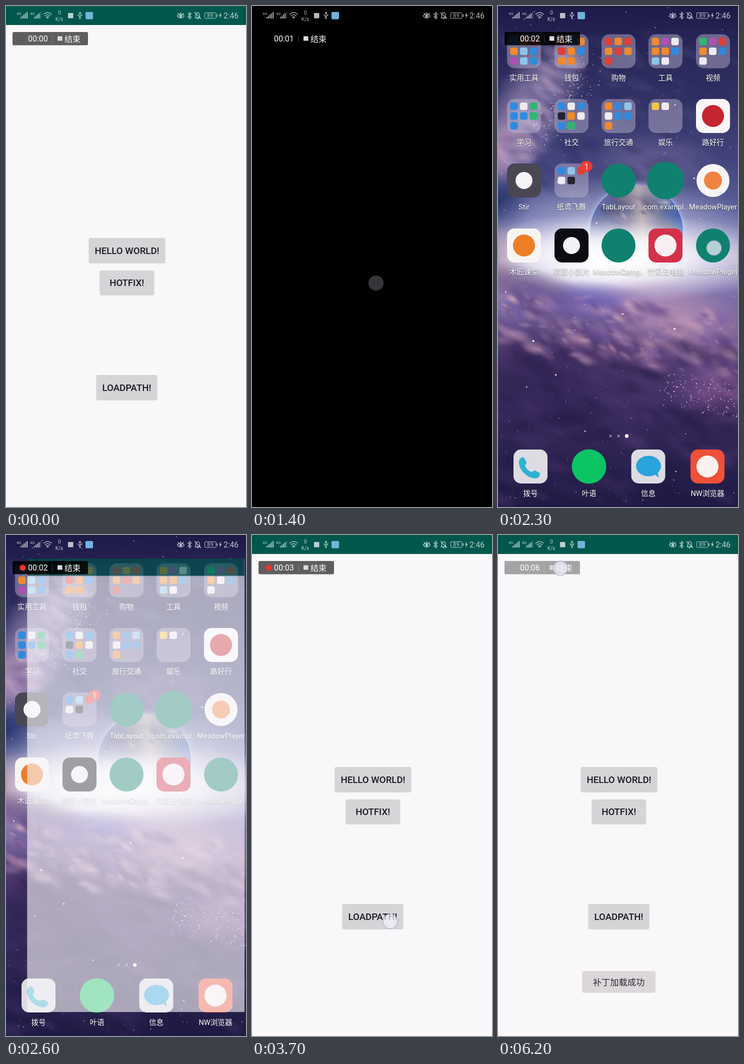
An HTML page with a canvas for the animation above (6300 ms loop, 480x1002 px).

```html
<!DOCTYPE html>
<html lang="zh">
<head>
<meta charset="utf-8">
<title>Hotfix demo</title>
<style>
html, body { margin: 0; width: 100%; height: 100%; overflow: hidden; background: #000; }
canvas, svg { position: absolute; left: 0; top: 0; width: 100%; height: 100%; display: block; }
text { font-family: Roboto, "Noto Sans CJK SC", "Noto Sans CJK", sans-serif; }
.mid { text-anchor: middle; }
.button { filter: drop-shadow(0 1.5px 1px rgba(0,0,0,.24)); }
.label { font-size: 14.6px; fill: #fff; text-anchor: middle; text-shadow: 0 1px 2px rgba(0,0,0,.55); }
.line { fill: none; stroke: #fff; stroke-width: 1.3; stroke-linecap: round; stroke-linejoin: round; }
</style>
</head>
<body>
<canvas id="sky" width="480" height="1002"></canvas>
<svg id="stage" viewBox="0 0 480 1002"></svg>
<script>
const LOOP = 6300, STEP = 100;
const $ = id => document.getElementById(id);

// ---------- wallpaper ----------
let seed = 11;
const rand = () => (seed = (seed * 16807) % 2147483647) / 2147483647;
const pick = list => list[Math.floor(rand() * list.length)];

function paintSky(c) {
  const blob = (x, y, rx, ry, rgb, a, turn = 0) => {
    c.save();
    c.translate(x, y);
    c.rotate(turn);
    c.scale(rx, ry);
    const g = c.createRadialGradient(0, 0, 0, 0, 0, 1);
    g.addColorStop(0, `rgba(${rgb},${a})`);
    g.addColorStop(.45, `rgba(${rgb},${a * .65})`);
    g.addColorStop(1, `rgba(${rgb},0)`);
    c.fillStyle = g;
    c.fillRect(-1, -1, 2, 2);
    c.restore();
  };
  const ramp = (x0, y0, x1, y1, stops) => {
    const g = c.createLinearGradient(x0, y0, x1, y1);
    stops.forEach(([p, color]) => g.addColorStop(p, color));
    return g;
  };
  const cloud = (count, place, tones, size, a) => {
    for (let i = 0; i < count; i++) {
      const [x, y] = place();
      const r = size * (.3 + rand());
      blob(x, y, r * 1.7, r * .7, pick(tones), a * (.4 + rand()), rand() * .9);
    }
  };
  const star = (x, y, r, a) => {
    c.fillStyle = `rgba(255,250,255,${a})`;
    c.beginPath();
    c.arc(x, y, r, 0, 7);
    c.fill();
  };

  c.fillStyle = ramp(0, 0, 0, 1002, [[0, '#1d1a49'], [.12, '#2c2a5c'], [.3, '#41437a'], [.42, '#5c639d'],
    [.5, '#a6a2cc'], [.57, '#8274ae'], [.68, '#5c4379'], [.8, '#3b2c60'], [1, '#1e1a43']]);
  c.fillRect(0, 0, 480, 1002);

  blob(60, 210, 190, 80, '190,165,205', .75, -1);
  blob(10, 290, 70, 70, '220,170,190', .6);
  blob(0, 395, 70, 60, '30,45,100', .8);
  blob(0, 500, 60, 75, '125,75,105', .7);
  blob(400, 130, 200, 110, '42,44,92', .6);
  blob(310, 310, 130, 60, '150,130,175', .4);
  cloud(90, () => { const k = rand(); return [110 * (1 - k) + 60 * rand(), 80 + 240 * k]; },
    ['225,195,220', '60,55,115', '150,130,190'], 18, .28);
  cloud(80, () => [rand() * 480, 40 + rand() * 330], ['28,28,76', '90,92,150'], 24, .2);

  blob(240, 470, 300, 130, '225,222,245', .75);
  c.save();
  c.shadowColor = '#b9d0ff';
  c.shadowBlur = 12;
  c.beginPath();
  c.arc(277, 451, 93, 0, 7);
  c.fillStyle = ramp(185, 430, 370, 410, [[0, '#6575b2'], [.3, '#5f6191'], [.55, '#b3a8ae'], [.78, '#69749f'], [1, '#3963b8']]);
  c.fill();
  c.clip();
  c.shadowBlur = 0;
  cloud(35, () => [200 + rand() * 150, 360 + rand() * 90], ['225,215,215', '65,65,110', '130,115,125'], 15, .35);
  c.restore();

  blob(240, 505, 330, 92, '255,252,255', 1);
  blob(230, 500, 190, 72, '255,255,255', 1);
  blob(200, 590, 140, 40, '95,85,180', .75, .1);
  blob(360, 625, 180, 75, '205,160,190', .7, .25);
  blob(60, 560, 130, 40, '95,70,120', .7, .25);
  blob(90, 740, 190, 120, '45,32,82', .75);
  blob(440, 770, 100, 70, '175,110,175', .5, .2);
  cloud(260, () => { const x = rand() * 480; return [x, 550 + x * .16 + rand() * 130]; },
    ['225,180,195', '110,85,165', '85,55,110', '190,145,180'], 17, .32);
  cloud(180, () => [rand() * 480, 670 + rand() * 330], ['35,25,68', '80,55,115', '28,24,62'], 26, .3);

  for (let i = 0; i < 420; i++) star(rand() * 480, rand() * 1002, .3 + rand() * .8, .15 + rand() * .6);
  for (let i = 0; i < 190; i++) {
    const k = rand();
    star(40 + 130 * k + 50 * rand(), 250 - 160 * k + 60 * rand(), .3 + rand() * .9, .3 + rand() * .6);
    star(330 + 150 * k, 730 + 70 * rand() + 25 * k, .3 + rand() * .9, .3 + rand() * .6);
  }
  for (let i = 0; i < 16; i++) star(rand() * 480, rand() * 1000, 1.3 + rand() * .8, .85);
}
paintSky($('sky').getContext('2d'));

// ---------- drawing helpers ----------
const rect = (x, y, w, h, fill, rx = 0, more = '') =>
  `<rect x="${x}" y="${y}" width="${w}" height="${h}" rx="${rx}" fill="${fill}" ${more}/>`;
const disc = (x, y, r, fill, more = '') => `<circle cx="${x}" cy="${y}" r="${r}" fill="${fill}" ${more}/>`;
const line = (d, more = '') => `<path class="line" d="${d}" ${more}/>`;
const text = (x, y, size, s, fill = '#fff', more = '') =>
  `<text x="${x}" y="${y}" font-size="${size}" fill="${fill}" ${more}>${s}</text>`;
const label = (x, y, s) => `<text class="label" x="${x}" y="${y}">${s}</text>`;
const tile = (x, y, fill, size = 68) => rect(x - size / 2, y - size / 2, size, size, fill, 15);

// ---------- home screen ----------
const COLS = [52, 147, 241, 335, 430], ROWS = [90.5, 220, 349, 479];
const TONES = { r: '#df3f38', o: '#f0892f', b: '#2f8ade', w: '#eeeaf0', g: '#2fb673',
  k: '#25242c', p: '#b04fb5', l: '#8fc4ea', y: '#efc64a' };

const folder = minis => (x, y) => tile(x, y, 'rgba(190,182,208,.46)') +
  [...minis].map((m, i) =>
    rect(x - 27.5 + i % 3 * 19.5, y - 27 + Math.floor(i / 3) * 19.5, 15, 15, TONES[m], 4)).join('');
const marked = (fill, mark, r) => (x, y) => tile(x, y, fill) + disc(x, y, r, mark);
const round = (fill, r = 34) => (x, y) => disc(x, y, r, fill);
const TEAL = '#10816f';

const apps = [
  ['实用工具', folder('borolbplb')], ['钱包', folder('rboroboo')], ['购物', folder('rororoo'.slice(0, 6) + 'r')],
  ['工具', folder('opwooblw')], ['视频', folder('gprowbw')],
  ['学习', folder('bwgbbgb')], ['社交', folder('bwbkowbg')], ['旅行交通', folder('oblwbbo')],
  ['娱乐', folder('yw')], ['路好行', marked('#f8f6f8', '#c4262f', 22)],
  ['Stir', marked('#4a4654', '#f6f4f8', 17)], ['纸鸢飞舞', folder('blrwk')], ['TabLayout', round(TEAL)],
  ['com.exampl..', round(TEAL, 37.5)], ['MeadowPlayer', (x, y) => disc(x, y, 33, '#f8f5f7') + disc(x, y, 18, '#f08343')],
  ['木匠课堂', marked('#f8f4f2', '#ee7d28', 22)], ['晴窗小影片', marked('#0d0b12', '#f5f2f6', 17)],
  ['MeadowComp..', round(TEAL)], ['竹溪云电脑', marked('#d4304a', '#f8eef0', 22)], ['MeadowPlugin', round(TEAL)]
];

const handset = `<path d="M43 907c3-5 8-6 10-2l4 7c1 3-3 5-3 7 2 6 7 11 13 13 3 0 4-4 7-3l8 4c4 2 2 8-3 11C63 949 36 926 43 907Z" fill="#2fb2cf"/>`;
const bubble = `<ellipse cx="301" cy="920" rx="25" ry="20.5" fill="#2ba3dd"/><path d="M309 934l13 9-4-16Z" fill="#2ba3dd"/>`;
const dock = [
  [65, '拨号', (x, y) => tile(x, y, '#dddce2') + handset], [182, '叶语', round('#0cc463', 34.5)],
  [300.5, '信息', (x, y) => tile(x, y, '#dddce2') + bubble], [419, 'NW浏览器', marked('#ee5038', '#fbf1ee', 22)]
];

const home = apps.map(([name, icon], i) => {
  const x = COLS[i % 5], y = ROWS[Math.floor(i / 5)];
  return icon(x, y) + label(x, y + 58, name);
}).join('') +
  dock.map(([x, name, icon]) => icon(x, 921) + label(x, 980, name)).join('') +
  rect(165, 310, 24, 21, '#ee3a30', 10.5) + text(177, 326.5, 16, '1', '#fff', 'class="mid"') +
  disc(225, 860, 2.5, '#fff', 'opacity=".4"') + disc(241, 860, 2.5, '#fff', 'opacity=".4"') + disc(257.5, 860, 3.7, '#fff');

// ---------- demo app ----------
const button = (id, x, y, w, h, s) => `<g class="button">${rect(x, y, w, h, '#d6d4d7', 2.5)}</g>` +
  rect(x, y, w, h, '#b9b4c0', 2.5, `id="${id}" opacity="0"`) +
  text(x + w / 2, y + h / 2 + 7, 18.67, s, '#1a1a1f', 'class="mid" font-weight="500"');

const app = rect(0, 0, 480, 1002, '#f9f7fa') + rect(0, 0, 480, 38, '#00574b') +
  `<g id="content">${button('hello', 166, 464, 152, 49, 'HELLO WORLD!')}` +
  button('hotfix', 188, 529, 107.5, 48, 'HOTFIX!') + button('load', 181, 738, 121, 49, 'LOADPATH!') + '</g>' +
  `<g id="toast">${rect(168, 872, 147, 43.5, '#dbd7da', 4)}${text(241.5, 901, 17.3, '补丁加载成功', '#2a2a2f', 'class="mid"')}</g>`;

// ---------- status bar and recorder pill ----------
const bars = (x, last) => [3, 5.5, 8, 10.5, 13].map((h, i) =>
  rect(x + i * 3.1, 25 - h, 1.8, h, '#fff', 0, i === 4 ? `opacity="${last}"` : '')).join('');

const status = text(21, 17.5, 7.5, '4G') + bars(29, 1) + text(48, 17.5, 7.5, '4G') + bars(56, .35) +
  line('M75.5 16.5q7.8-7 15.600 0M78 19.700q5.200-4.600 10.400 0M80.500 22.600q2.700-2.200 5.400 0', 'stroke-width="1.6"') + disc(83.300, 24, 1.200, '#fff') +
  text(107, 16.500, 10.500, '0', '#fff', 'class="mid"') + text(106.500, 30, 10, 'K/s', '#fff', 'class="mid"') +
  rect(124, 14, 10.500, 10.500, '#fff', 1) +
  line('M148 13v11M146.500 14.500l1.500-2 1.500 2M144.500 17v2.500l3.500 2.500M151.500 16.500v2.500l-3.500 2') + disc(148, 24.500, 1.500, '#fff') +
  line('M342.500 20q7-8 14 0-7 8-14 0ZM344 14.500l1.500 2M349.500 13v2M355 14.500l-1.500 2') + disc(349.500, 20, 2.700, '#fff') +
  line('M363.500 15.500l7 7-3.500 3.500V12.500l3.500 3.500-7 7') +
  line('M378 23.500h10.500l-1.500-2.500v-4q-.5-3.500-3.700-3.700-3.300.2-3.700 3.700v4ZM382 25.500h2.500M377.500 13l12 12.500') +
  rect(397.500, 13.500, 22.500, 11.500, 'none', 1.500, 'stroke="#fff"') + rect(421.500, 16.500, 1.500, 5.500, '#fff') +
  text(408.700, 23, 10.800, '89', '#fff', 'class="mid" letter-spacing=".5"') +
  '<path d="M430 12.500l-4 7h2.500l-1.500 6 4.500-7.500h-2.500Z" fill="#fff"/>' +
  text(435, 25, 15.600, '2:46');

const pill = rect(13, 52, 151, 26.500, '#000', 3, 'id="pill"') + disc(33.500, 65.500, 6, '#ee3428', 'id="dot"') +
  text(44, 71, 16, '00:00', '#fff', 'id="clock"') + rect(92.500, 58, 1, 15, '#fff', 0, 'opacity=".22"') +
  rect(103, 60.500, 9.500, 9, '#ddd9de') + text(117, 71.500, 16, '结束');

const touches = [
  { x: 248, y: 554, fade: [[1100, 0], [1200, 1], [1300, 1], [1400, .3], [1500, 0]] },
  { x: 432, y: 484, fade: [[2200, 0], [2300, 1], [2400, .6], [2500, 0]] },
  { x: 276.500, y: 773, fade: [[3500, 0], [3600, .8], [3700, 1], [3800, .8], [3900, 0]] },
  { x: 248, y: 556, fade: [[4600, 0], [4700, 1], [4800, 1], [4900, 0]] },
  { x: 125, y: 66.500, fade: [[6000, 0], [6100, .8], [6200, 1]] }
];

$('stage').innerHTML = `<g id="home">${home}</g><g id="app">${app}</g>` +
  `<g opacity=".72">${status}</g>${rect(159, 12, 15, 14.500, '#70b4dc', 2)}${pill}` +
  touches.map((p, i) => disc(p.x, p.y, 14.500, 'rgba(243,241,251,.72)',
    `id="touch${i}" stroke="#b4aad6" stroke-opacity=".85" stroke-width="1.6"`)).join('');

// ---------- motion ----------
const tracks = {
  home: [[1500, 0], [1600, .5], [1700, .92], [1800, 1]],
  window: [[2400, 0], [2500, .35], [2600, .63], [2700, .88], [2800, 1]],
  scale: [[2400, .2], [2500, .66], [2600, .905], [2700, .98], [2800, 1]],
  content: [[2700, 0], [2800, .7], [2900, 1]],
  toast: [[4900, 0], [5000, .25], [5100, .9], [5200, 1]],
  rise: [[4900, 9], [5000, 5], [5100, 0]],
  hotfix1: [[1200, 0], [1300, .8]],
  hotfix2: [[4600, 0], [4700, .5], [4800, .9], [4900, .7], [5000, .38], [5100, .1], [5200, 0]],
  load: [[3700, 0], [3800, .7], [3900, .7], [4000, .35], [4100, 0]],
  pill: [[6000, .62], [6100, .5], [6200, .34]]
};

function at(track, t) {
  const i = track.findIndex(([time]) => time > t);
  if (i === 0) return track[0][1];
  if (i < 0) return track[track.length - 1][1];
  const [t0, a] = track[i - 1], [t1, b] = track[i];
  return a + (b - a) * (t - t0) / (t1 - t0);
}
const show = (id, opacity) => $(id).setAttribute('opacity', opacity);

function draw(t) {
  const first = t < 1400, launched = t >= 2800;
  const homeAlpha = first || launched ? 0 : at(tracks.home, t);
  $('sky').style.opacity = homeAlpha;
  show('home', homeAlpha);

  const s = first ? 1 : at(tracks.scale, t);
  show('app', first ? 1 : at(tracks.window, t));
  $('app').setAttribute('transform', `translate(445 498) scale(${s}) translate(-445 -498)`);
  show('content', first ? 1 : at(tracks.content, t));
  show('hotfix', at(first ? tracks.hotfix1 : tracks.hotfix2, t));
  show('load', at(tracks.load, t));
  show('toast', at(tracks.toast, t));
  $('toast').setAttribute('transform', `translate(0 ${at(tracks.rise, t)})`);

  show('pill', homeAlpha ? .85 : at(tracks.pill, t));
  show('dot', t % 1000 >= 500 ? 1 : 0);
  $('clock').textContent = '00:0' + Math.floor(t / 1000);
  touches.forEach((p, i) => show('touch' + i, at(p.fade, t)));
}

const start = performance.now();
function tick() {
  const t = (performance.now() - start) % LOOP;
  draw(Math.floor(t / STEP) * STEP);
  requestAnimationFrame(tick);
}
tick();
</script>
</body>
</html>
```
